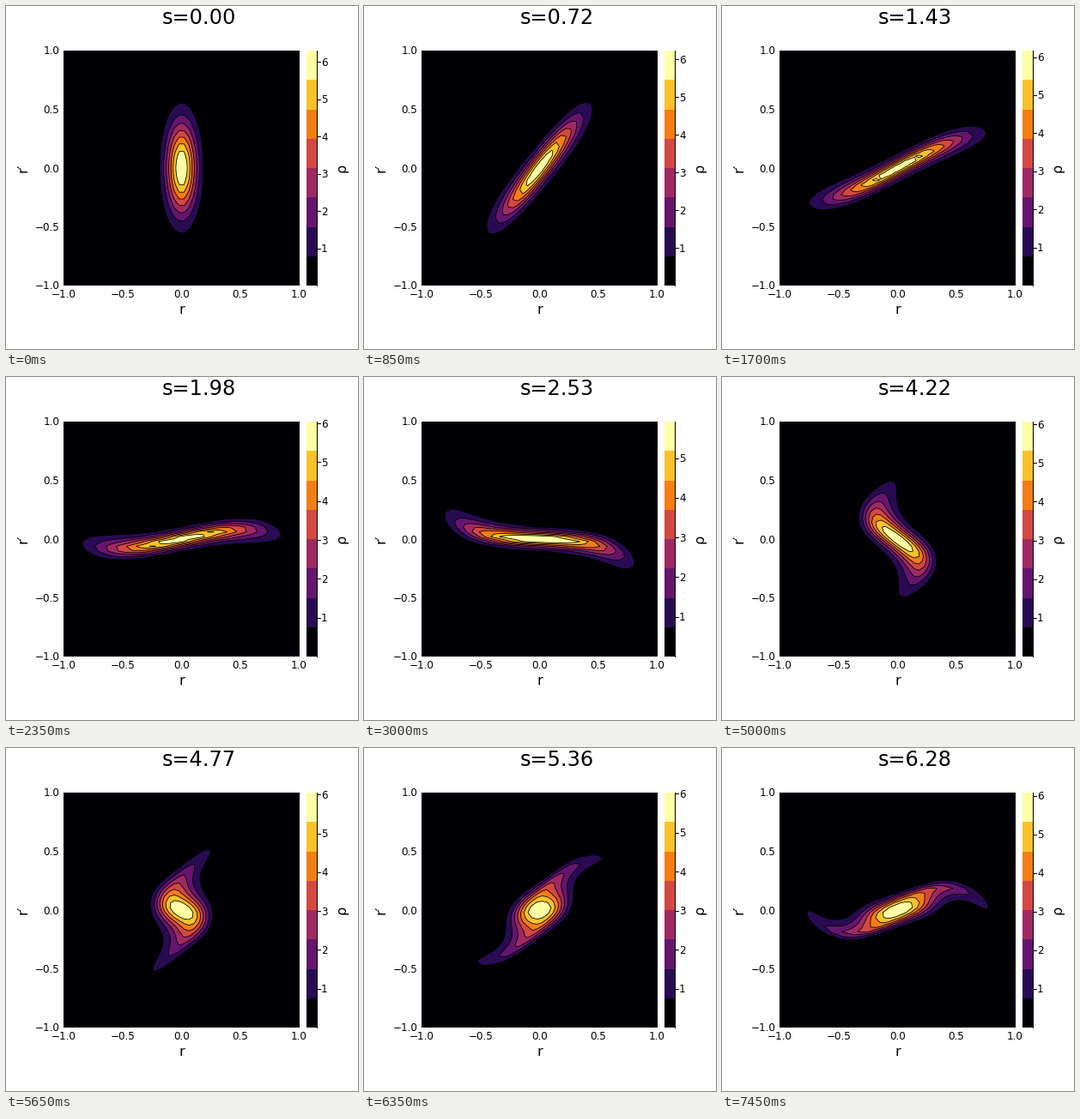
Recreate the animation shown at these times as a matplotlib script. Size 410x400 px, loop 7.5 s.

```python
import numpy as np
import matplotlib.pyplot as plt
from matplotlib.animation import FuncAnimation
from matplotlib.patches import Rectangle

plt.rcParams["font.family"] = "DejaVu Sans"

W, H, DPI = 410, 400, 80
FRAMES, INTERVAL = 150, 50
PT = 72 / DPI
CX, CY, UNIT = 204.5, 189, 137
TOP, BOTTOM = 52, 326
BANDS = 8
COLORS = plt.get_cmap("inferno")(np.linspace(0, 1, BANDS))

# Beam in a periodic focusing channel with its own space charge
SIG_R, SIG_P, CHARGE = 0.09, 0.27, 0.65
S = np.linspace(0, 2 * np.pi, FRAMES)
STEP = S[1]
FIELD_X = np.linspace(-1.6, 1.6, 401)


def focus(s):
    return 1.03 + 0.12 * np.cos(s)


def peak(s):
    return np.interp(s, [0, 1.43, 2.53, 3.50, 4.22, 5.36, 6.28],
                     [6.30, 6.17, 5.92, 6.13, 6.07, 6.03, 6.08])


def field(r, weight, s):
    order = np.argsort(r)
    w = weight[order]
    inside = np.cumsum(w) - w / 2
    push = CHARGE * (np.interp(FIELD_X, r[order], inside) - 0.5)
    push = (push - push[::-1]) / 2
    return push - focus(s) * FIELD_X


def track():
    """Forces at the middle of every step, from a weighted particle cloud."""
    z = np.linspace(-3.3, 3.3, 81)
    a, b = (g.ravel() for g in np.meshgrid(z, z))
    weight = np.exp(-(a**2 + b**2) / 2)
    weight /= weight.sum()
    r, p = SIG_R * a, SIG_P * b
    forces = []
    for s in S[:-1]:
        r = r + p * STEP / 2
        force = field(r, weight, s + STEP / 2)
        p = p + STEP * np.interp(r, FIELD_X, force)
        r = r + p * STEP / 2
        forces.append(force)
    return forces


AXIS = np.linspace(-1, 1, 50)
FORCES = track()


def density(i):
    """Trace the grid back to s = 0 and read the starting Gaussian there."""
    r, p = np.meshgrid(AXIS, AXIS)
    for force in FORCES[:i][::-1]:
        r = r - p * STEP / 2
        p = p - STEP * np.interp(r, FIELD_X, force)
        r = r - p * STEP / 2
    rho = np.exp(-(r / SIG_R)**2 / 2 - (p / SIG_P)**2 / 2)
    return rho / rho.max()


fig = plt.figure(figsize=(W / DPI, H / DPI), dpi=DPI, facecolor="white")
ax = fig.add_axes([0, 0, 1, 1])
ax.set_axis_off()


def label(x, y, text, px, ha="center", **kw):
    return ax.text(x, y, text, fontsize=px * PT, ha=ha, va="baseline", **kw)


def box(x, y, w, h, color):
    ax.add_patch(Rectangle((x, y), w, h, facecolor=color, lw=0,
                           antialiased=False))


box(67, TOP, 275, BOTTOM - TOP, COLORS[0])
band_h = (BOTTOM - TOP) / BANDS
for k, color in enumerate(COLORS):
    box(350, BOTTOM - (k + 1) * band_h, 12, band_h, color)
ax.plot([362, 362], [TOP, BOTTOM], color="black", lw=PT)

for v in (-1, -0.5, 0, 0.5, 1):
    text = f"{v:.1f}".replace("-", "\u2212")
    label(CX + UNIT * v, 340, text, 12)
    label(62.5, CY - UNIT * v + 4.5, text, 12, ha="right")

turned = dict(rotation=90, rotation_mode="anchor")
label(CX, 359, "r", 16)
label(25, CY, "r\u2032", 16, **turned)
label(395, CY, "\u03c1", 16, **turned)
title = label(225, 21, "", 24)

marks = [(ax.plot([362, 366], [0, 0], color="black", lw=PT)[0],
          label(367, 0, str(n), 12, ha="left")) for n in range(1, 7)]
ax.set_xlim(0, W)
ax.set_ylim(H, 0)

LEVELS = np.arange(1, BANDS + 1) / BANDS
LEVELS[-1] += 1e-6
GX, GY = CX + UNIT * AXIS, CY - UNIT * AXIS
shown = []


def draw(i):
    while shown:
        shown.pop().remove()
    rho = density(i)
    shown.append(ax.contourf(GX, GY, rho, LEVELS, colors=COLORS[1:],
                             antialiased=True, zorder=2))
    shown.append(ax.contour(GX, GY, rho, LEVELS[:-1], colors="black",
                            linewidths=0.75 * PT, zorder=3))
    title.set_text(f"s={S[i]:.2f}")
    top = peak(S[i])
    for n, (tick, text) in enumerate(marks, 1):
        y = BOTTOM - (BOTTOM - TOP) * n / top
        tick.set_ydata([y, y])
        text.set_y(y + 4.5)
        tick.set_visible(n <= top)
        text.set_visible(n <= top)
    ax.set_xlim(0, W)
    ax.set_ylim(H, 0)
    return []


anim = FuncAnimation(fig, draw, frames=FRAMES, interval=INTERVAL,
                     init_func=lambda: [], repeat=True, repeat_delay=0)
plt.show()
```
